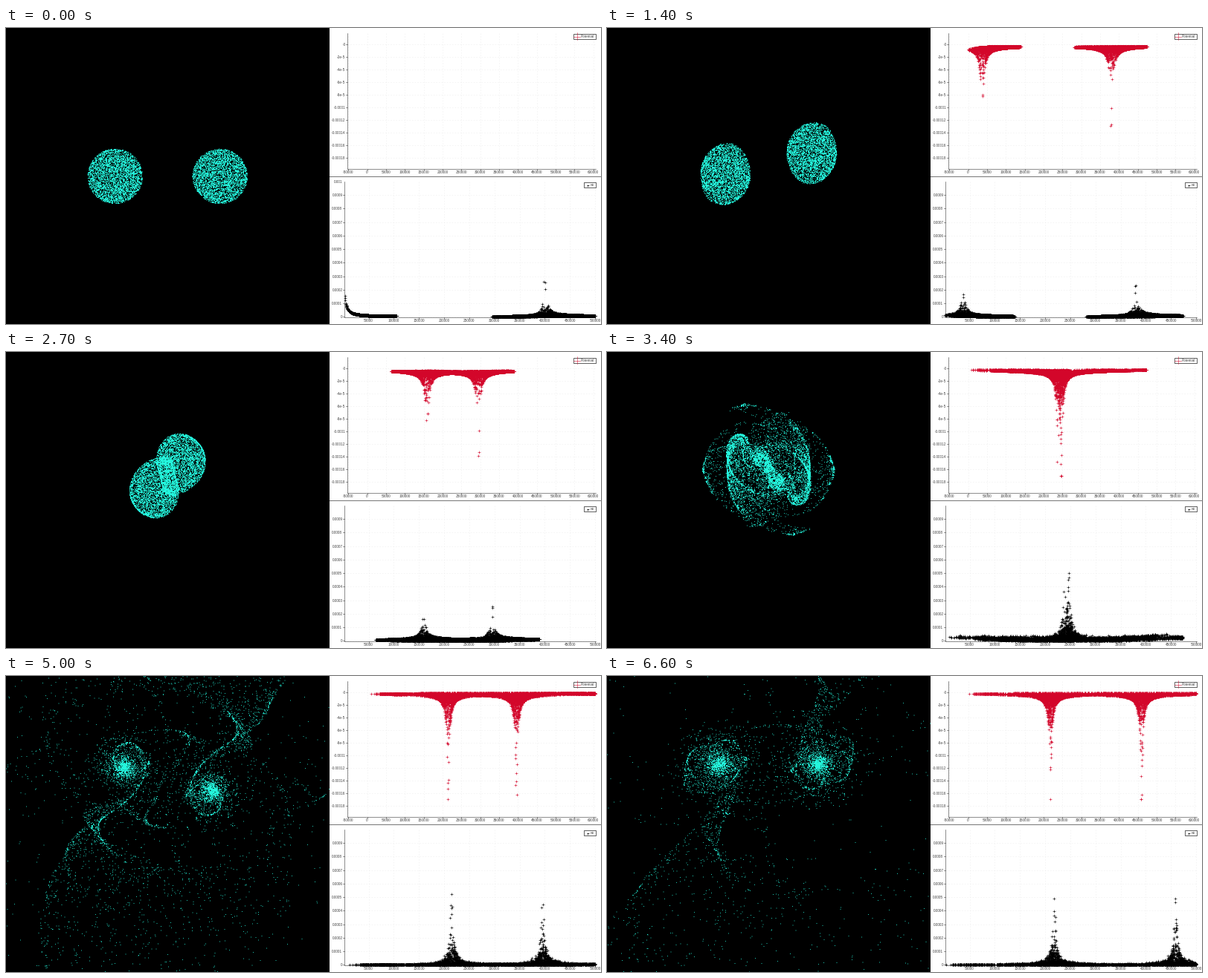
Recreate the animation shown at these times as a matplotlib script. Size 800 by 399 pixels, loop 6.7 s.

```python
import numpy as np
import matplotlib.pyplot as plt
from matplotlib.animation import FuncAnimation
from matplotlib.patches import Rectangle

W, H, SPLIT = 800, 399, 435
FRAMES, SUB = 67, 64
PT = 0.72                              # points per pixel at 100 dpi

# Orbit of the two discs, in pixels and frames (y points down)
AXIS, ECC, PERIOD = 76.4, 0.845, 62.0
GM = (2 * np.pi / PERIOD) ** 2 * AXIS ** 3 / 2
SOFT, RADIUS, R_MIN, COUNT = 1.5, 37.0, 0.55, 4000

UNIT = 2837.0                          # plotted distance per pixel
DRIFT = -(5 + 4j) / 66                 # slow motion of the distance origin
KE_SCALE, POT_SCALE = 7.5e-8, 9.3e-5
GLOW = 0.8
TEAL = np.array([36, 245, 220]) / 255
RED = "#d3062a"
INK = "#444444"


def centres(t):
    """Positions of both discs: a Kepler ellipse on a drifting barycentre."""
    e_grid = np.linspace(0, 2.4 * np.pi, 40001)
    e = np.interp(2 * np.pi * t / PERIOD, e_grid + ECC * np.sin(e_grid), e_grid)
    minor = AXIS * np.sqrt(1 - ECC ** 2)
    rel = AXIS * (np.cos(e) + ECC) - 1j * minor * np.sin(e)
    s = np.clip((t - 27) / 9, 0, 1)
    s = s * s * (3 - 2 * s)
    rel = rel * (1 + (0.96 * np.exp(0.06j) - 1) * s)
    mid = 217.3 + 1j * (200 - 1.22 * t)
    return mid - rel / 2, mid + rel / 2


def pull(pos, c):
    d = c - pos
    q = d.real ** 2 + d.imag ** 2 + SOFT ** 2
    return d * (GM / (q * np.sqrt(q)))


def simulate():
    rng = np.random.default_rng(7)
    dt = 1 / SUB
    paths = centres(np.arange(FRAMES * SUB + 1) * dt)
    pos, vel = [], []
    for path in paths:
        r = RADIUS * np.sqrt(rng.uniform((R_MIN / RADIUS) ** 2, 1, COUNT))
        turn = np.exp(2j * np.pi * rng.random(COUNT))
        speed = np.sqrt(GM) * r / (r * r + SOFT ** 2) ** 0.75
        pos.append(path[0] + r * turn)
        vel.append((path[1] - path[0]) / dt - 1j * turn * speed)
    pos, vel = np.concatenate(pos), np.concatenate(vel)
    states = []
    for n in range(FRAMES * SUB):
        a, b = paths[0][n], paths[1][n]
        if n % SUB == 0:
            states.append((pos.copy(), vel.copy(), (a, b)))
        vel += (pull(pos, a) + pull(pos, b)) * dt
        pos += vel * dt
    return states


def energies(pos, vel, pair):
    pot, ke = 0, vel.real ** 2 + vel.imag ** 2
    for c in pair:
        r = np.maximum(np.abs(pos - c), R_MIN)
        pot = pot - POT_SCALE / r
        # restore the speed that softening removes close to a centre
        ke = ke + GM * (1 / r - r * r / (r * r + SOFT ** 2) ** 1.5)
    return pot, KE_SCALE * ke


def splat(pos):
    """Dots one pixel wide, placed on half pixels; overlaps add up."""
    x, y = (np.round(2 * v - 1) / 2 for v in (pos.real, pos.imag))
    ok = (x >= 0) & (x < SPLIT) & (y >= 0) & (y < H)
    x, y = x[ok], y[ok]
    ix, iy = x.astype(int), y.astype(int)
    fx, fy = x - ix, y - iy
    wide = SPLIT + 1
    img = np.zeros(wide * (H + 1))
    for dx, wx in ((0, 1 - fx), (1, fx)):
        for dy, wy in ((0, 1 - fy), (1, fy)):
            img += np.bincount((iy + dy) * wide + ix + dx, wx * wy, img.size)
    img = np.clip(GLOW * img.reshape(H + 1, wide)[:H, :SPLIT], 0, 1)
    return img[..., None] * TEAL


fig = plt.figure(figsize=(W / 100, H / 100), dpi=100, facecolor="white")
ax = fig.add_axes([0, 0, 1, 1])
ax.set_axis_off()


def line(xs, ys, color=INK, lw=0.6, **kw):
    return ax.plot(xs, ys, color=color, lw=lw * PT, **kw)[0]


def text(x, y, s, ha="center", size=4.8):
    return ax.text(x, y, s, ha=ha, va="center_baseline", fontsize=size * PT,
                   family="Liberation Sans", color=INK)


def label(v):
    return f"{v:g}".replace("e-0", "e-")


def chart(left, top, bottom, xticks, yticks, x_of, y_of):
    dash = dict(color="#f0f0f0", lw=0.6, ls=(0, (3, 3)), zorder=0)
    for v in xticks:
        x = x_of(v)
        line([x, x], [top, bottom], **dash)
        line([x, x], [bottom, bottom + 2])
        text(x, bottom + 4.5, str(v))
    for v in yticks:
        y = y_of(v)
        line([left, 793], [y, y], **dash)
        line([left - 2, left], [y, y])
        text(left - 2, y, label(v), "right")
    line([left, left], [top, bottom])
    line([left, 793], [bottom, bottom])


def legend_box(x, y, w, h):
    ax.add_patch(Rectangle((x, y), w, h, fc="white", ec="#222222",
                           lw=0.7 * PT, zorder=4))


def pot_x(v):
    return 485.5 + v * 25.35 / 50000


def pot_y(v):
    return 22.4 - v * 16.92 / 2e-5


def ke_x(v):
    return 453.7 + v * 33.83 / 50000


def ke_y(v):
    return 389.3 - v * 18.24 / 1e-4


chart(458.5, 7, 189.5, range(-50000, 600001, 50000),
      [-2e-5 * i for i in range(10)], pot_x, pot_y)
chart(454.5, 207, 389.5, range(50000, 500001, 50000),
      [1e-4 * i for i in range(10)], ke_x, ke_y)
line([SPLIT, W], [199.5, 199.5], "#777777", 1)
top_label = text(452.5, ke_y(0.001), "0.001", "right")

legend_box(762.5, 7.5, 30, 7)
line([763, 772], [11.5, 11.5], RED, 0.5, zorder=5)
line([768, 768], [6, 16], RED, 0.5, zorder=5)
text(772.7, 11.2, "Potential", "left", 4.6).set_zorder(5)
legend_box(776.5, 207.5, 16, 7)
line([781.5], [211.5], "black", 0.6, marker="+", ms=3 * PT, mew=0.6 * PT, zorder=5)
text(788, 211.2, "KE", size=4.4).set_zorder(5)


def crosses(color):
    return line([], [], color, 0, ls="none", marker="+", ms=5 * PT,
                mew=0.55 * PT, zorder=3)


pot_dots, ke_dots = crosses(RED), crosses("black")
sky = ax.imshow(np.zeros((H, SPLIT, 3)), extent=(0, SPLIT, H, 0),
                interpolation="nearest", aspect="auto", zorder=6)
ax.set_xlim(0, W)
ax.set_ylim(H, 0)

states = simulate()
origin = states[0][2][0]


def update(n):
    pos, vel, pair = states[n]
    sky.set_data(splat(pos))
    dist = np.abs(pos - origin - DRIFT * n) * UNIT
    pot, ke = energies(pos, vel, pair)
    x, y = pot_x(dist), pot_y(pot)
    ok = (x <= 792) & (y <= 189) & (n > 0)
    pot_dots.set_data(x[ok], y[ok])
    x, y = ke_x(dist), ke_y(ke)
    ok = (x <= 792) & (y >= 207)
    ke_dots.set_data(x[ok], y[ok])
    top_label.set_visible(n == 0)
    return sky, pot_dots, ke_dots, top_label


anim = FuncAnimation(fig, update, frames=FRAMES, interval=100,
                     repeat=True, repeat_delay=0, blit=False)
plt.show()
```
